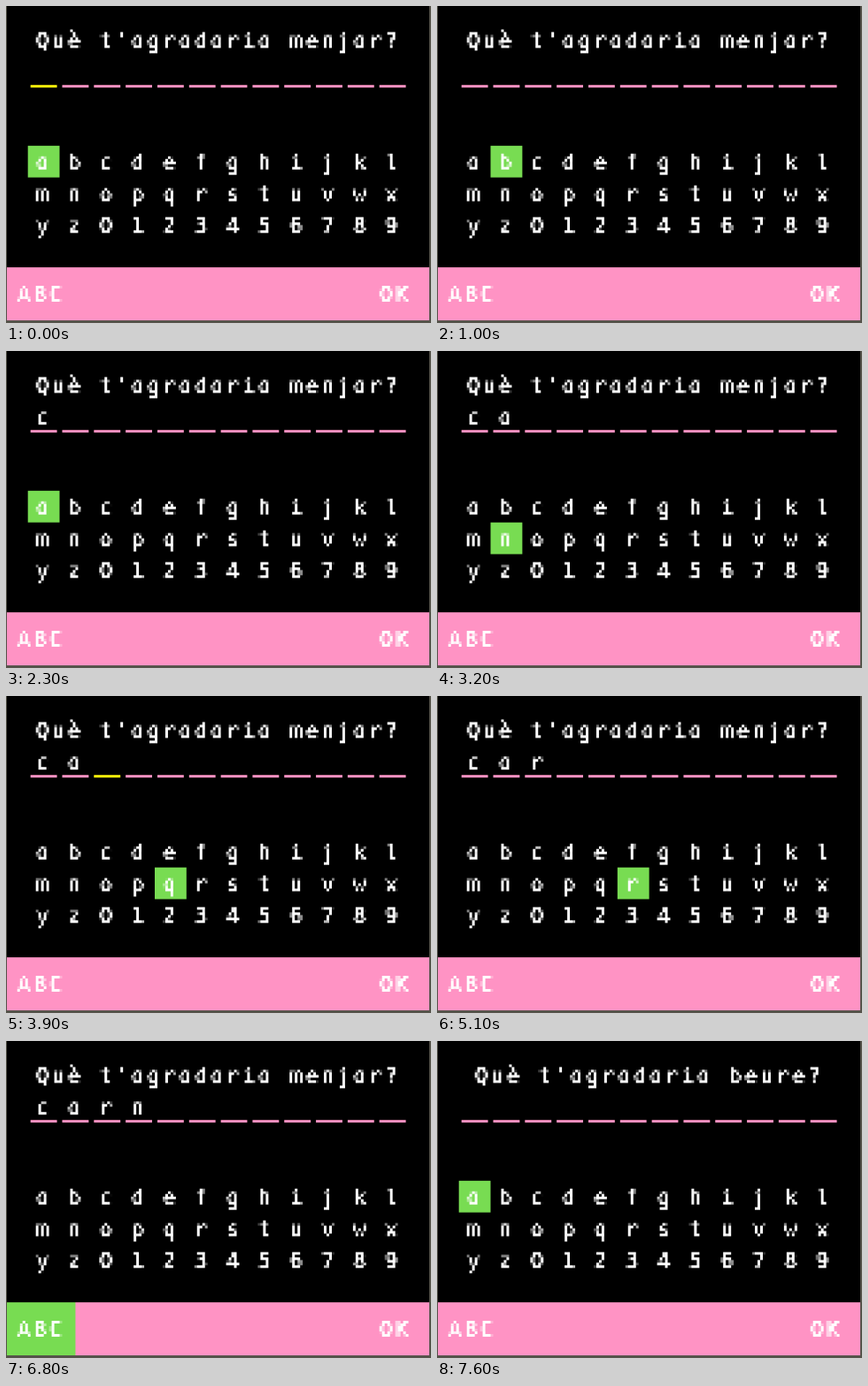
Animation, 480 px wide and 358 px high, one loop 8 s. Source, as an HTML page with a canvas:

```html
<!DOCTYPE html>
<html lang="ca">
<head>
<meta charset="utf-8">
<title>Teclat</title>
<style>
  html, body { margin: 0; width: 100%; height: 100%; overflow: hidden; background: #55534a; }
  canvas { display: block; }
</style>
</head>
<body>
<canvas id="stage" width="480" height="358"></canvas>
<script>
const LOOP = 8000;
const W = 160, H = 120;        // size of the low resolution screen
const CELL = 12, LEFT = 8;     // keyboard and answer grid
const SCALE = 2.985;           // stage pixels per screen pixel
const INK_SCALE = 5;           // odd, so that sampling hits pixel centres
const COLORS = { back: '#000', pink: '#ff93c4', green: '#78dc52', lit: '#fff609', text: '#fff' };
const ROWS = ['abcdefghijkl', 'mnopqrstuvwx', 'yz0123456789'];
const BUTTONS = [
  { label: 'ABC', x: 0, textX: 6.5 },
  { label: 'OK', x: 134, textX: 143.5 }
];
const BUTTON_W = 26, BAR_Y = 100;
const PLAIN_FORMS = { a: 'ɑ', 0: 'O' };   // one-storey a, zero without a dot

// Each step changes only what it names: focus is a key or a button, lit a blank.
const STEPS = [
  [0, { title: "Què t'agradaria menjar?", typed: '', focus: 'a', lit: 0 }],
  [600, { lit: -1 }],
  [1000, { focus: 'b' }],
  [1300, { lit: 0 }],
  [1400, { focus: 'c' }],
  [1600, { typed: 'c', lit: 1 }],
  [2000, { focus: 'b' }],
  [2200, { lit: -1 }],
  [2300, { focus: 'a' }],
  [2600, { typed: 'ca', lit: 2 }],
  [2900, { focus: 'm' }],
  [3100, { focus: 'n' }],
  [3200, { lit: -1 }],
  [3400, { focus: 'o' }],
  [3600, { focus: 'p' }],
  [3800, { lit: 2 }],
  [3900, { focus: 'q' }],
  [4100, { focus: 'r' }],
  [4400, { typed: 'car', lit: 3 }],
  [5100, { lit: -1 }],
  [5200, { focus: 'q' }],
  [5400, { focus: 'p' }],
  [5700, { focus: 'o', lit: 3 }],
  [5900, { focus: 'n' }],
  [6100, { typed: 'carn', lit: 4 }],
  [6500, { focus: 'z' }],
  [6800, { focus: 'ABC', lit: -1 }],
  [7200, { focus: 'OK' }],
  [7400, { lit: 4 }],
  [7600, { title: "Què t'agradaria beure?", typed: '', focus: 'a', lit: -1 }]
];

function makeContext(width, height) {
  const canvas = document.createElement('canvas');
  canvas.width = width;
  canvas.height = height;
  return canvas.getContext('2d');
}

const stage = document.getElementById('stage').getContext('2d');
const screen = makeContext(W * 3, H * 3);
const pixels = makeContext(W, H);
const ink = makeContext(W * INK_SCALE, H * INK_SCALE);

screen.imageSmoothingEnabled = pixels.imageSmoothingEnabled = false;
screen.scale(3, 3);
ink.scale(INK_SCALE, INK_SCALE);
ink.font = '8.2px "DejaVu Sans Mono", monospace';
ink.textAlign = 'center';
ink.lineWidth = 0.22;
ink.lineJoin = 'round';
ink.fillStyle = ink.strokeStyle = COLORS.text;

function box(color, x, y, w, h) {
  screen.fillStyle = color;
  screen.fillRect(x, y, w, h);
}

// x is the centre of the first letter, y the baseline
function write(text, x, y, pitch = 6) {
  [...text].forEach((letter, i) => {
    const form = PLAIN_FORMS[letter] ?? letter;
    ink.fillText(form, x + i * pitch, y);
    ink.strokeText(form, x + i * pitch, y);
  });
}

function stateAt(time) {
  const passed = STEPS.filter(([start]) => start <= time);
  return Object.assign({}, ...passed.map(([, change]) => change));
}

function draw(time) {
  const { title, typed, focus, lit } = stateAt(time);
  ink.clearRect(0, 0, W, H);
  box(COLORS.back, 0, 0, W, H);

  write(title, (W - title.length * 6) / 2 + 2.5, 17);
  write(typed, LEFT + 5.5, 29, CELL);
  for (let i = 0; i < CELL; i++) {
    box(i === lit ? COLORS.lit : COLORS.pink, LEFT + 1 + i * CELL, 31, 10, 1);
  }

  ROWS.forEach((row, r) => {
    const y = 54 + r * CELL;
    const col = row.indexOf(focus);
    if (col >= 0) box(COLORS.green, LEFT + col * CELL, y, CELL, CELL);
    write(row, LEFT + 5.5, y + 9, CELL);
  });

  box(COLORS.pink, 0, BAR_Y, W, H - BAR_Y);
  for (const { label, x, textX } of BUTTONS) {
    if (label === focus) box(COLORS.green, x, BAR_Y, BUTTON_W, H - BAR_Y);
    write(label, textX, 113);
  }

  // Sample the text into coarse pixels, then lay the screen on the stage.
  pixels.clearRect(0, 0, W, H);
  pixels.drawImage(ink.canvas, 0, 0, W, H);
  screen.drawImage(pixels.canvas, 0, 0);
  stage.clearRect(0, 0, 480, 358);
  stage.drawImage(screen.canvas, 0.8, -3.4, W * SCALE, H * SCALE);
}

const start = performance.now();
function tick() {
  draw((performance.now() - start) % LOOP);
  requestAnimationFrame(tick);
}
tick();
</script>
</body>
</html>
```
